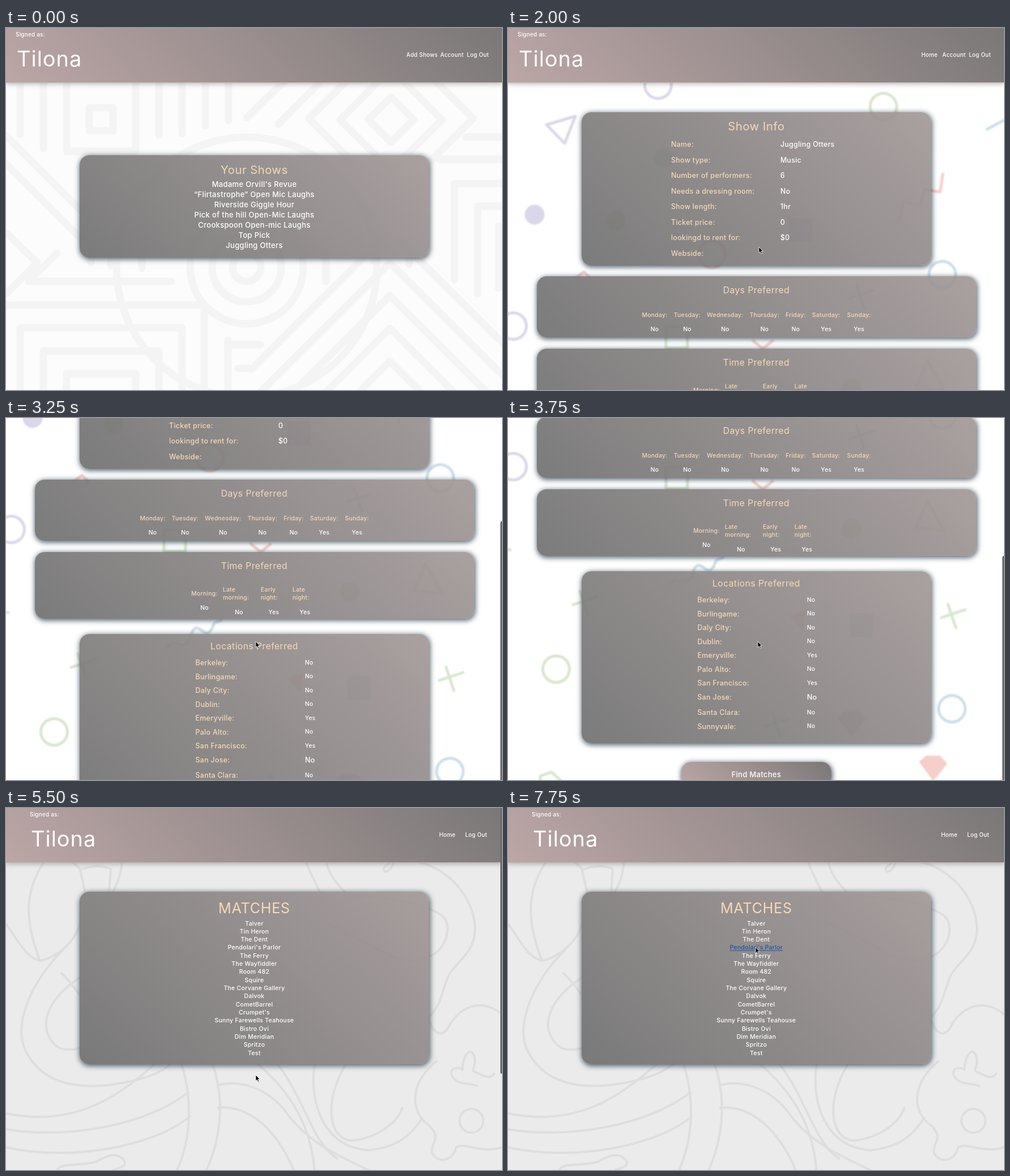
An HTML page for the animation above (8000 ms loop, 876 by 640 pixels).

```html
<!DOCTYPE html>
<html lang="en">
<head>
<meta charset="utf-8">
<title>Show matcher</title>
<style>
  html, body { margin: 0; width: 100%; height: 100%; overflow: hidden; background: #fff; }
  #stage { position: relative; width: 876px; height: 640px; overflow: hidden; }
  .page { position: absolute; left: 0; top: 0; width: 876px; height: 1537px; }
  .page svg { position: absolute; left: 0; top: 0; }
  .card, .bar { position: absolute; box-sizing: border-box; }
  .card {
    border-radius: 17px;
    background: linear-gradient(45deg, rgba(109,109,109,.9), rgba(161,150,150,.9));
    box-shadow: 1px 2px 10px 1px rgba(40,60,75,.8);
  }
  .bar, .card.button { background: linear-gradient(45deg, #bca6a6, #7b7878); }
  .bar {
    left: 0; top: 0; width: 876px; height: 97px;
    border-bottom: 1.5px solid #ccb3b3;
    box-shadow: 0 2px 8px rgba(60,50,50,.35);
  }
  text { font-family: Inter, "Open Sans", sans-serif; font-weight: 500; letter-spacing: .025em; }
  text.title { font-weight: 400; }
  text.hover { fill: #1a55a6; text-decoration: underline; }
  #thumb {
    position: absolute; left: 873px; top: 0; width: 6px; height: 470px;
    border-radius: 3px; background: #6c6c6c;
  }
  #pointer { position: absolute; left: 0; top: 0; overflow: visible; }
</style>
</head>
<body>
<div id="stage">
  <div id="thumb"></div>
  <svg id="pointer" width="10" height="14">
    <path d="M0,0V10.5L2.4,8.4L4.2,12.2L5.9,11.4L4.2,7.8H7.4Z" fill="#000" stroke="#fff" stroke-width=".8"/>
  </svg>
</div>
<script>
const LOOP = 8000, STEP = 250;
const PEACH = '#f5d9b6', WHITE = '#fff';
const GREEN = '#d8e7cd', PURPLE = '#dbd7ea', BLUE = '#cddfe9', RED = '#f6cfca';
const stage = document.getElementById('stage');
const thumb = document.getElementById('thumb');
const pointer = document.getElementById('pointer');

const text = (x, y, size, str, fill = WHITE, anchor = 'start', cls = '') =>
  `<text x="${x}" y="${y}" font-size="${size}" fill="${fill}" text-anchor="${anchor}" class="${cls}">${str}</text>`;
const centered = (x, y, size, str, fill, cls) => text(x, y, size, str, fill, 'middle', cls);
const title = (y, size, str) => centered(438.5, y, size, str, PEACH, 'title');
const card = (x, y, w, h, cls = '') =>
  `<div class="card ${cls}" style="left:${x}px;top:${y}px;width:${w}px;height:${h}px"></div>`;
const svg = body => `<svg width="876" height="1537">${body}</svg>`;
const path = (d, color, width) =>
  `<path d="${d}" fill="none" stroke="${color}" stroke-width="${width}" stroke-linecap="round" stroke-linejoin="round"/>`;
const solid = (d, color) => `<path d="${d}" fill="${color}"/>`;
const ring = (x, y, r, color, width) =>
  `<circle cx="${x}" cy="${y}" r="${r}" fill="none" stroke="${color}" stroke-width="${width}"/>`;
const disc = (x, y, color) => `<circle cx="${x}" cy="${y}" r="17.5" fill="${color}"/>`;

function header(left, nav) {
  return text(left, 15, 9.9, 'Signed as:') +
    text(left + 2, 68, 38, 'Tilona', WHITE, 'start', 'title') +
    nav.map(([x, label]) => text(x, 51, 9.9, label)).join('');
}

function addPage(color, backdrop, boxes, labels) {
  const page = document.createElement('div');
  page.className = 'page';
  page.style.background = color;
  page.innerHTML = svg(backdrop) + '<div class="bar"></div>' + boxes + svg(labels);
  stage.insertBefore(page, thumb);
  return page;
}

// Thick-lined geometric pattern
function geometricBackdrop() {
  const diamond = r => `M680,${162 - r}l${r},${r}l${-r},${r}l${-r},${-r}Z`;
  const chevron = y => `M378,${y + 300}L678,${y}L978,${y + 300}`;
  const arch = (x1, x2, y) => `M${x1},660V${y}H${x2}V660`;
  const lines = [
    'M25,90V188M66,90V213M270,90V190M311,90V187M352,90V173M393,90V164',
    'M107,90V218H229V90M147,141H189V182H147Z',
    'M425,159L495,90M481,170L560,90M605,90L535,160L610,235M755,90L825,160L750,235',
    diamond(40), diamond(90),
    'M812,193H880M765,232H880M880,275H792V445M880,315H833V470M870,350V460',
    'M0,190L135,325M0,240L135,375M0,362L55,415L0,470M90,398L40,448H292',
    'M0,490H350V660', arch(25, 311, 530), arch(66, 270, 571), arch(107, 229, 611),
    'M392,640V552M392,560H450M410,602H435L660,377M696,376L890,570',
    'M565,395V448M240,395V425M185,395V420M150,395V415M650,395V412M712,395V418',
    ...[415, 473, 531, 589].map(chevron)
  ];
  return lines.map(d => path(d, '#f4f4f4', 13)).join('') +
    [25, 61, 100, 230].map(r => ring(425, 423, r, '#f4f4f4', 13)).join('');
}

// Soft scattered confetti shapes
function confettiBackdrop() {
  const line = (d, color) => path(d, color, 5);
  const cross = (x, y, color) => line(`M${x - 20},${y + 5}l42,-14M${x - 8},${y - 19}l14,42`, color);
  const gem = (x, y, color) => solid(`M${x - 25},${y - 11}l12,-11h25l13,14l-25,31Z`, color);
  const house = (x, y, color) => line(`M${x},${y}l20,-7l25,23l-7,21l-37,2Z`, color);
  const square = (x, y, color) => solid(`M${x - 21},${y - 21}h42v42h-42Z`, color);
  const frame = (x, y, color) => line(`M${x - 19},${y - 19}h38v38h-38Z`, color);
  const hoop = (x, y, color) => ring(x, y, 23.5, color, 5);
  return '<g style="filter:blur(.8px)">' + [
    hoop(265, 101, PURPLE), hoop(663, 139, GREEN), hoop(767, 436, BLUE), hoop(9, 527, PURPLE),
    hoop(85, 885, GREEN), hoop(784, 955, BLUE), hoop(360, 400, RED),
    disc(47, 330, PURPLE), disc(607, 637, GREEN), disc(421, 1173, BLUE), disc(190, 341, GREEN), disc(275, 230, BLUE),
    line('M68,171L119,156L100,204Z', PURPLE), line('M741,588L770,640L720,635Z', GREEN),
    line('M846,179L880,161', BLUE), line('M692,340L698,308L728,313L735,285L763,290L768,258', RED),
    line('M120,442L134,431L146,443M433,553L450,567L467,553', RED),
    line('M285,735C300,715 315,750 326,715C338,680 350,725 362,705C372,690 360,695 380,688', BLUE),
    line('M-5,674H4', GREEN), line('M198,1248L222,1240', PURPLE),
    cross(623, 473, BLUE), cross(135, 766, GREEN), cross(785, 789, GREEN), cross(475, 981, BLUE),
    square(517, 357, PURPLE), square(624, 807, BLUE), square(612, 1170, GREEN),
    frame(298, 547, GREEN), frame(268, 1129, PURPLE),
    solid('M497,790L527,780L520,815Z', RED), gem(607, 981, PURPLE), gem(751, 1060, RED),
    house(57, 1074, GREEN), house(822, 1150, BLUE)
  ].join('') + '</g>';
}

// Thin-lined curling doodle
function doodleBackdrop() {
  const lines = [
    'M67,96C30,150 35,205 60,270M0,205C25,240 38,268 62,270C98,260 125,230 130,205',
    'M118,96C126,103 131,106 131,110L140,150M131,110C150,101 170,101 185,108L182,150M205,96C202,125 194,138 188,150',
    'M100,252C50,300 10,380 35,430C60,480 110,497 180,490C240,482 275,468 290,453',
    'M98,292C112,305 122,320 130,330M130,300C85,330 65,365 72,395C85,430 105,430 130,425',
    'M0,540C120,565 200,510 262,453M0,568C100,585 240,565 322,503M0,600C110,625 260,600 325,545',
    'M310,453C328,510 330,580 300,645M365,453C388,520 378,590 352,645',
    'M378,489C420,480 470,500 500,545C535,590 580,612 640,640M375,530C430,525 480,570 510,645',
    'M445,453C500,500 540,560 545,645M480,453C530,520 540,590 585,620',
    'M600,453C560,520 570,585 610,588C650,585 690,560 700,530M545,453C535,520 560,600 640,605C690,600 715,580 735,548',
    'M530,96C538,115 545,130 555,150M566,96C570,120 590,140 600,150M685,96C680,110 668,118 667,108C668,102 674,102 678,96',
    'M730,96C790,110 832,170 828,220C825,260 790,275 780,300C765,340 770,345 745,372',
    'M600,160C660,150 740,170 770,190C792,210 775,258 740,265',
    'M876,365C840,335 800,350 780,390C765,410 752,390 747,375M747,262C700,290 650,240 560,200',
    'M760,448C715,485 710,535 748,562C770,585 750,592 752,608C760,630 790,625 795,600C810,590 840,612 876,600',
    'M832,491C815,485 800,490 790,477C778,462 798,455 806,463C808,428 825,422 828,444C830,460 818,465 832,468C845,475 855,480 862,470',
    'M90,640C100,625 130,635 160,625C185,610 200,610 210,625C212,635 200,635 190,640'
  ];
  return lines.map(d => path(d, '#dedede', 4)).join('') + ring(822, 553, 21, '#dedede', 4);
}

const shows = ["Madame Orvill's Revue", '“Flirtastrophe” Open Mic Laughs', 'Riverside Giggle Hour',
  'Pick of the hill Open-Mic Laughs', 'Crookspoon Open-mic Laughs', 'Top Pick', 'Juggling Otters'];

const home = addPage('#fcfcfc', geometricBackdrop(), card(130, 225, 617, 181),
  header(17, [[707, 'Add Shows'], [767, 'Account'], [814, 'Log Out']]) +
  title(258, 20.3, 'Your Shows') +
  shows.map((s, i) => centered(438.5, 280.5 + 18 * i, 13, s, WHITE, 'show')).join(''));

const info = [['Name:', 'Juggling Otters'], ['Show type:', 'Music'], ['Number of performers:', '6'],
  ['Needs a dressing room:', 'No'], ['Show length:', '1hr'], ['Ticket price:', '0'],
  ['lookingd to rent for:', '$0'], ['Webside:', '']];
const days = [[259, 'Monday:', 'No'], [316.5, 'Tuesday:', 'No'], [383.5, 'Wednesday:', 'No'],
  [453, 'Thursday:', 'No'], [508, 'Friday:', 'No'], [562, 'Saturday:', 'Yes'], [620, 'Sunday:', 'Yes']];
const times = [[383, 'Late', 'morning:', 411.5, 'No'], [450, 'Early', 'night:', 473, 'Yes'],
  [506, 'Late', 'night:', 528, 'Yes']];
const places = ['Berkeley', 'Burlingame', 'Daly City', 'Dublin', 'Emeryville', 'Palo Alto',
  'San Francisco', 'San Jose', 'Santa Clara', 'Sunnyvale'];

function placeRow(name, i) {
  const y = 767 + 24.55 * i + (i > 7 ? 3 : 0);
  const big = name === 'San Jose';
  const answer = /Emery|Francisco/.test(name) ? 'Yes' : 'No';
  return text(334.5, y, 12.4, name + ':', PEACH) +
    text(528, big ? y : y - 1.5, big ? 12.6 : 10.3, answer);
}

const details = addPage('#fff', confettiBackdrop(),
  card(130, 149, 617, 271) + card(51, 439, 776, 108) + card(51, 567, 776, 118) +
  card(130, 712, 617, 304) + card(306, 1049, 265, 44, 'button'),
  header(17, [[730, 'Home'], [767, 'Account'], [814, 'Log Out']]) +
  title(181, 20.3, 'Show Info') +
  info.map(([k, v], i) => text(288, 210 + 27.5 * i, 12.4, k, PEACH) + text(481, 210 + 27.5 * i, 12.4, v)).join('') +
  title(469, 15.8, 'Days Preferred') +
  days.map(([x, k, v]) => centered(x, 511, 10.4, k, PEACH) + centered(x, 536, 10.4, v)).join('') +
  title(597, 15.8, 'Time Preferred') +
  centered(350.5, 644, 10.4, 'Morning:', PEACH) + centered(350.5, 669, 10.4, 'No') +
  times.map(([x, a, b, cx, v]) => text(x, 636.5, 10.4, a, PEACH) + text(x, 650.5, 10.4, b, PEACH) +
    centered(cx, 676.5, 10.4, v)).join('') +
  title(739, 15.8, 'Locations Preferred') +
  places.map(placeRow).join('') +
  centered(438.5, 1075.5, 13, 'Find Matches', WHITE, 'find'));

const venues = ['Talver', 'Tin Heron', 'The Dent', "Pendolari's Parlor", 'The Ferry', 'The Wayfiddler',
  'Room 482', 'Squire', 'The Corvane Gallery', 'Dalvok', 'CometBarrel', "Crumpet's",
  'Sunny Farewells Teahouse', 'Bistro Ovi', 'Dim Meridian', 'Spritzo', 'Test'];

const matches = addPage('#ebebeb', doodleBackdrop(), card(130, 148, 617, 305),
  header(42, [[765, 'Home'], [811, 'Log Out']]) +
  title(185.5, 25.3, 'MATCHES') +
  venues.map((v, i) => centered(438.5, 207.5 + 14.33 * i, 10.5, v, WHITE, 'venue')).join(''));

const lastShow = [...home.querySelectorAll('.show')].pop();
const findButton = details.querySelector('.find');
const venueRows = [...matches.querySelectorAll('.venue')];

// Keys are [time, value, ...]; values are interpolated linearly.
function track(keys, t) {
  if (t <= keys[0][0]) return keys[0].slice(1);
  for (let i = 1; i < keys.length; i++) {
    const a = keys[i - 1], b = keys[i];
    if (t <= b[0]) {
      const k = (t - a[0]) / (b[0] - a[0]);
      return a.slice(1).map((v, j) => v + (b[j + 1] - v) * k);
    }
  }
  return keys[keys.length - 1].slice(1);
}

const scrollKeys = [[2250, 0], [2500, 25], [2750, 100], [3250, 330], [3500, 405], [3750, 441],
  [4000, 475], [4500, 580], [4750, 605]];
const pointerKeys = [[250, 472, 384], [500, 455, 388], [750, 443, 387], [2000, 443, 387], [2500, 441, 395],
  [4750, 441, 395], [5000, 441, 473], [5500, 441, 472], [5750, 441, 472], [6500, 442, 390], [7500, 437, 246]];

function render(time) {
  const t = Math.floor(time % LOOP / STEP) * STEP;
  const scroll = track(scrollKeys, t)[0];
  const [x, y] = track(pointerKeys, t);
  const current = t < 2000 ? home : t < 5500 ? details : matches;
  for (const page of [home, details, matches]) page.style.display = page === current ? '' : 'none';

  details.style.transform = `translateY(${-scroll}px)`;
  thumb.style.transform = `translateY(${current === details ? scroll * .553 : 0}px)`;
  thumb.style.display = (t >= 2500 && t < 5000) || (t >= 5500 && t < 6250) ? '' : 'none';
  pointer.style.display = t < 250 ? 'none' : '';
  pointer.style.transform = `translate(${x}px,${y}px)`;

  lastShow.classList.toggle('hover', t >= 1250);
  findButton.classList.toggle('hover', t >= 5000);
  const row = Math.floor((y - 196.5) / 14.33);
  venueRows.forEach((el, i) => el.classList.toggle('hover', i === row));
}

const start = performance.now();
function tick() {
  render(performance.now() - start);
  requestAnimationFrame(tick);
}
tick();
</script>
</body>
</html>
```
